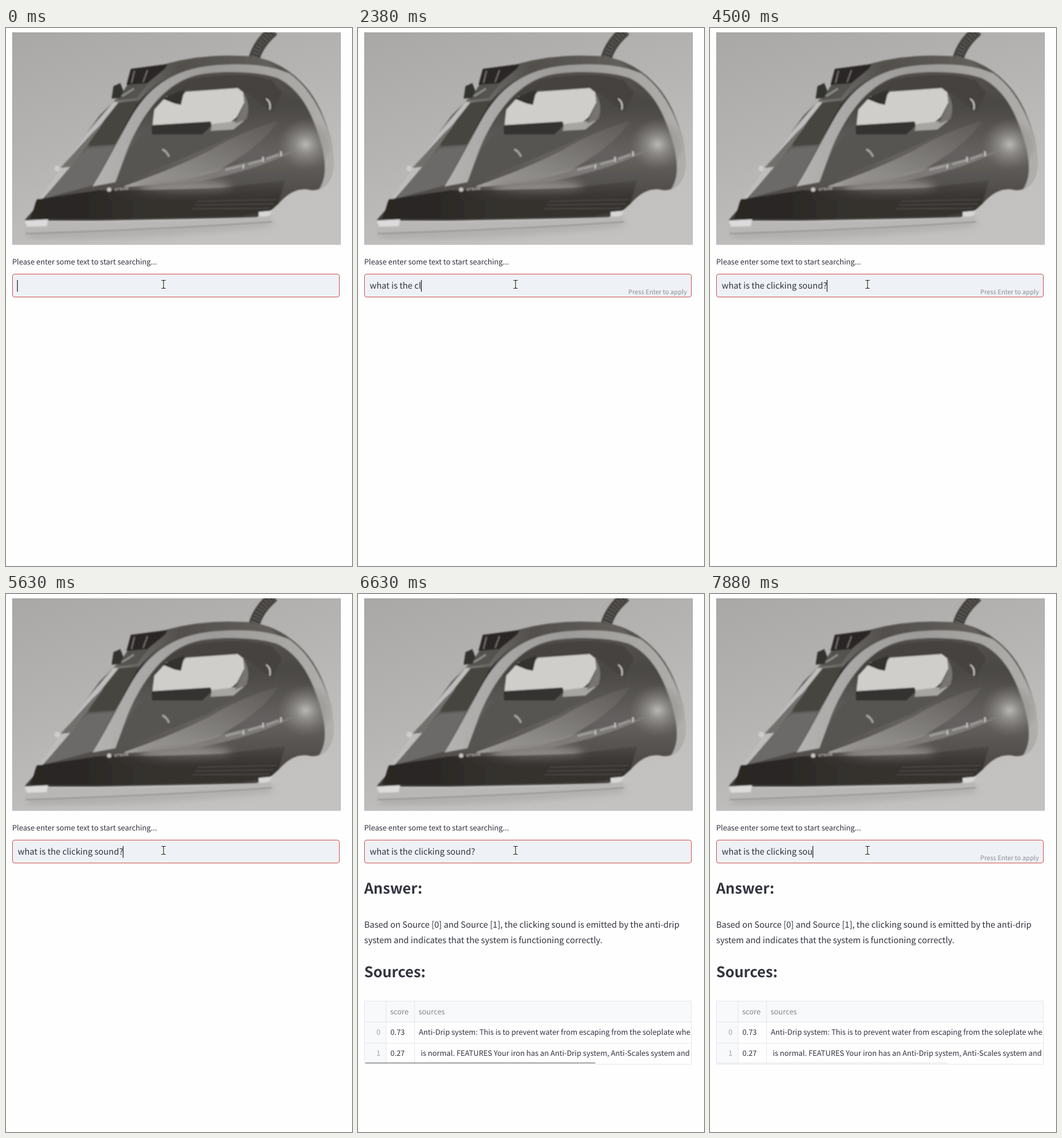
An HTML page for the animation above (8 s loop, 560x869 px).

```html
<!DOCTYPE html>
<html lang="en">
<head>
<meta charset="utf-8">
<title>Search demo</title>
<style>
  html, body { margin: 0; width: 100%; height: 100%; overflow: hidden; background: #fefefe; }
  svg { display: block; }
  text {
    font: 13.67px "Noto Sans CJK JP", "Noto Sans CJK SC", "Noto Sans CJK", "Open Sans", sans-serif;
    fill: #31333f; white-space: pre; text-rendering: geometricPrecision;
  }
  .small { font-size: 11.96px; }
  .hint { font-size: 10.25px; fill: #8c8e95; }
  .title { font-size: 23.6px; font-weight: 700; }
  .head { fill: #85878e; }
  .index { fill: #a3a5ab; text-anchor: end; }
  .print { font-size: 5.5px; font-weight: 700; fill: #c4c3c2; letter-spacing: 1px; }
</style>
</head>
<body>
<svg width="560" height="869" viewBox="0 0 560 869">
  <defs>
    <clipPath id="frame"><rect x="10" y="7" width="532" height="343.5"/></clipPath>
    <clipPath id="sheet"><rect x="10" y="656" width="530" height="105"/></clipPath>
    <filter id="soft"><feGaussianBlur stdDeviation="1"/></filter>
    <filter id="blur" x="-50%" y="-50%" width="200%" height="200%"><feGaussianBlur stdDeviation="7"/></filter>
    <linearGradient id="wall" x1="0" y1="0" x2=".5" y2="1">
      <stop stop-color="#a9a8a7"/><stop offset=".5" stop-color="#b6b4b3"/><stop offset="1" stop-color="#c4c2c1"/>
    </linearGradient>
    <linearGradient id="shell" x1="0" y1="0" x2="0" y2="1">
      <stop stop-color="#5a5754"/><stop offset=".3" stop-color="#4b4845"/>
      <stop offset=".6" stop-color="#656260"/><stop offset="1" stop-color="#403d3a"/>
    </linearGradient>
    <linearGradient id="crown" x1="0" y1="0" x2="1" y2="0">
      <stop stop-color="#797774"/><stop offset=".4" stop-color="#524f4c"/><stop offset="1" stop-color="#64615e"/>
    </linearGradient>
    <linearGradient id="band" x1="0" y1="0" x2="1" y2="0">
      <stop stop-color="#b4b3b1"/><stop offset=".5" stop-color="#9d9b99"/><stop offset="1" stop-color="#b1afac"/>
    </linearGradient>
    <linearGradient id="sweep" x1="0" y1="1" x2="1" y2="0">
      <stop stop-color="#a19f9c"/><stop offset="1" stop-color="#5c5956"/>
    </linearGradient>
    <linearGradient id="base" x1="0" y1="0" x2="0" y2="1">
      <stop stop-color="#35322f" stop-opacity=".25"/><stop offset=".55" stop-color="#35322f"/><stop offset="1" stop-color="#35322f"/>
    </linearGradient>
    <linearGradient id="nose" x1="0" y1="0" x2="1" y2="0">
      <stop stop-color="#292624"/><stop offset=".45" stop-color="#2c2927"/><stop offset="1" stop-color="#35322f" stop-opacity="0"/>
    </linearGradient>
    <radialGradient id="shine">
      <stop stop-color="#bcbab7"/><stop offset=".35" stop-color="#9c9a97" stop-opacity=".75"/>
      <stop offset="1" stop-color="#807d7a" stop-opacity="0"/>
    </radialGradient>
  </defs>

  <g clip-path="url(#frame)">
    <path d="M10 7H542V350.5H10Z" fill="url(#wall)"/>
    <g filter="url(#soft)">
      <path d="M36 333Q230 335 430 314" fill="none" stroke="#959392" stroke-width="6" filter="url(#blur)"/>
      <!-- hose -->
      <path d="M401 52Q407 26 433 4" fill="none" stroke="#403e3b" stroke-width="18"/>
      <path d="M401 52Q407 26 433 4" fill="none" stroke="#676461" stroke-width="13" stroke-dasharray="1.5 4"/>
      <!-- shell -->
      <path d="M30 311L85 234 129 172 152 141 180 113 205 88 262 57Q325 40 398 46C438 52 468 73 490 101 514 132 528 178 530 214 531 244 517 263 494 262 472 256 455 268 441 284L425 298 405 306 150 311Z" fill="url(#shell)"/>
      <path d="M172 124Q195 94 262 59 330 41 398 46 432 51 446 76 420 59 340 61 270 66 230 101L205 138Z" fill="url(#crown)"/>
      <!-- light strip around the handle -->
      <path d="M140 256C165 215 185 175 205 140 235 92 275 65 340 60 400 56 430 62 458 73 503 104 529 172 530 214 531 240 520 256 507 260 524 235 515 196 500 156 487 121 468 95 440 81 410 70 340 67 302 78 250 94 215 150 195 200L177 249Z" fill="url(#band)"/>
      <!-- handle and opening -->
      <path d="M236 134Q257 96 300 82 380 68 430 84L447 105 430 135 386 103 290 100Z" fill="#45423f" filter="url(#soft)"/>
      <path d="M237 158L240 132 260 110 276 121 291 103 375 97 384 104 386 120 374 143 357 158 334 165 331 152Z" fill="#d0cecb"/>
      <path d="M253 114L289 99 283 124 273 122Z" fill="#31302d"/>
      <path d="M236 157L331 151 333 157 318 172 236 172Z" fill="#353330"/>
      <path d="M334 155L386 149 368 164 331 166Z" fill="#a7a5a2"/>
      <path d="M384 104Q397 125 389 147L370 155 386 122Z" fill="#777471"/>
      <path d="M421 114Q430 120 427 132 429 120 421 114Z" fill="#c8c6c3" stroke="#c8c6c3" stroke-width="2"/>
      <!-- lower body sweep -->
      <path d="M182 249Q190 196 222 172L318 172 375 164Q330 198 184 249Z" fill="#575451"/>
      <path d="M192 255Q270 228 330 198 376 169 440 150 420 187 340 232 280 252 192 257Z" fill="url(#sweep)"/>
      <path d="M210 254Q300 240 380 219 440 207 470 197 400 232 310 248Z" fill="#8f8d8a" opacity=".65"/>
      <ellipse cx="485" cy="188" rx="46" ry="42" fill="url(#shine)"/>
      <path d="M253 196Q260 199 264 208" fill="none" stroke="#aaa8a5" stroke-width="3"/>
      <!-- tank and nose -->
      <path d="M63 275L88 236 132 195 174 191 141 254Z" fill="#6c6a68"/>
      <path d="M133 191Q149 148 178 121L214 117 176 188Z" fill="#474441"/>
      <path d="M176 188L212 121 229 103 204 141Z" fill="#353330"/>
      <path d="M30 310L84 234 129 172 174 119 182 120 142 170 105 223 58 278Z" fill="#bfbebc"/>
      <path d="M88 226L106 224 131 190 160 150 140 169Z" fill="#72706d"/>
      <circle cx="83" cy="227" r="4.5" fill="#cfcecc"/>
      <!-- buttons -->
      <path d="M180 117L197 91 232 87 212 113Z" fill="#555350"/>
      <path d="M195 92L202 66 262 58 257 66 229 89Z" fill="#2a2826"/>
      <path d="M208 69L203 89M229 68L222 87" stroke="#777572" stroke-width="2"/>
      <path d="M171 114L174 94 185 89 190 102 184 113Z" fill="#31302d"/>
      <path d="M188 110L207 98" stroke="#92908d" stroke-width="3"/>
      <!-- dark base and soleplate -->
      <ellipse cx="290" cy="258" rx="75" ry="13" fill="#8b8885" filter="url(#blur)"/>
      <path d="M50 277L150 262Q260 262 350 258L452 246 441 283 425 297 380 304 150 309 39 308Z" fill="url(#base)"/>
      <path d="M50 277L150 262H270V307L150 309 39 308Z" fill="url(#nose)"/>
      <path d="M310 280L438 277M306 286L433 284M302 292L427 291" stroke="#595653" stroke-width="1.2"/>
      <path d="M30 323L66 313Q240 317 428 304L430 313Q240 326 32 332Z" fill="#b9b7b6"/>
      <path d="M32 332Q240 326 430 313" fill="none" stroke="#8b8988" stroke-width="1.5"/>
      <path d="M30 311L68 309 66 320 34 321Z" fill="#dddcdb"/>
      <path d="M409 297L431 295 425 304 409 305Z" fill="#d8d7d5"/>
      <!-- printed marks -->
      <circle cx="167" cy="261" r="3.5" fill="#c4c3c2"/>
      <text class="print" transform="translate(176 263) rotate(-5)">STEAM</text>
      <path d="M356 229L380 223M393 220L416 213M422 211L441 204" stroke="#aeaca9" stroke-width="3.5" stroke-dasharray="3 1.5"/>
      <path d="M384 220V227M416 208V216M445 199V207" stroke="#c4c2bf" stroke-width="3"/>
    </g>
  </g>

  <text class="small" x="10" y="382">Please enter some text to start searching...</text>
  <rect x="10.5" y="397.5" width="529" height="37" rx="3.5" fill="#eef2f6" stroke="#d05a57"/>
  <text id="query" x="19" y="421"></text>
  <path id="caret" d="M0 407V426" stroke="#25272f" stroke-width="1.2"/>
  <text id="hint" class="hint" x="437.5" y="430">Press Enter to apply</text>
  <g id="pointer" fill="none">
    <path id="beam" d="M251.5 407.5H254L255 408.5 256 407.5H258.5M255 408V420M251.5 420.5H254L255 419.5 256 420.5H258.5" stroke="#fff" stroke-width="3"/>
    <path d="M251.5 407.5H254L255 408.5 256 407.5H258.5M255 408V420M251.5 420.5H254L255 419.5 256 420.5H258.5" stroke="#222" stroke-width="1.1"/>
  </g>

  <g id="answer">
    <text class="title" x="10" y="484">Answer:</text>
    <text x="10" y="538.5">Based on Source [0] and Source [1], the clicking sound is emitted by the anti-drip</text>
    <text x="10" y="563.5">system and indicates that the system is functioning correctly.</text>
    <text class="title" x="10" y="619">Sources:</text>
  </g>
  <g id="table" clip-path="url(#sheet)">
    <path d="M540 657.5H10.5V759.5H540" fill="none" stroke="#e8e8ed"/>
    <path d="M539.5 664V759" stroke="#e8e8ed"/>
    <path id="blank" d="M12 658H21V691H12Z" fill="#f8f8fb" stroke="#f0f0f4"/>
    <g id="rows">
      <path d="M11 658H540V691H45V759H11Z" fill="#f8f9fb"/>
      <path d="M11 691.5H540M11 725.5H540M45.5 658V759M91.5 658V759M539.5 658V759" stroke="#e8e8ed"/>
      <text class="small head" x="52" y="678.5">score</text>
      <text class="small head" x="98" y="678.5">sources</text>
      <text class="small index" x="36.5" y="712">0</text>
      <text class="small" x="52.5" y="712">0.73</text>
      <text class="small" x="98.5" y="712">Anti-Drip system: This is to prevent water from escaping from the soleplate whe</text>
      <text class="small index" x="36.5" y="745.5">1</text>
      <text class="small" x="52.5" y="745.5">0.27</text>
      <text class="small" x="101.5" y="745.5">is normal. FEATURES Your iron has an Anti-Drip system, Anti-Scales system and</text>
    </g>
    <path d="M12 757.5H384" stroke="#e3e3e7"/>
    <path id="bar" d="M12 757.5H384" stroke="#606166"/>
  </g>
</svg>
<script>
  const LOOP = 8000;
  const PHRASE = "what is the clicking sound?";
  const typed = [630, 750, 880, 1000, 1250, 1380, 1500, 1630, 1750, 1880, 2000, 2130, 2250, 2380,
    2500, 2630, 2750, 3000, 3000, 3130, 3250, 3380, 3500, 3630, 3750, 3880, 4500];
  const erased = [7380, 7630, 7880];
  const caretOff = [[4380, 4500], [5000, 5500], [6630, 7130]];

  const el = id => document.getElementById(id);
  const [query, caret, hint, answer, table, blank, rows, bar] =
    ["query", "caret", "hint", "answer", "table", "blank", "rows", "bar"].map(el);
  const passed = (times, t) => times.filter(k => k <= t).length;
  const within = (t, [from, to]) => t >= from && t < to;
  const show = (node, on) => node.setAttribute("visibility", on ? "visible" : "hidden");

  function draw(now) {
    const t = now % LOOP;
    const text = PHRASE.slice(0, passed(typed, t) - passed(erased, t));
    if (query.textContent !== text) query.textContent = text;
    const width = text ? query.getComputedTextLength() : 0;
    caret.setAttribute("transform", `translate(${Math.round(19 + width) + (text ? .5 : -.5)} 0)`);
    show(caret, !caretOff.some(span => within(t, span)));
    show(hint, within(t, [typed[0], 5000]) || t >= erased[0]);
    show(answer, t >= 6250);
    show(table, t >= 6380);
    show(blank, within(t, [6380, 6630]));
    show(rows, t >= 6630);
    bar.setAttribute("opacity", Math.max(0, Math.min(1, (7250 - t) / 250)));
    requestAnimationFrame(() => draw(performance.now()));
  }
  draw(performance.now());
</script>
</body>
</html>
```
